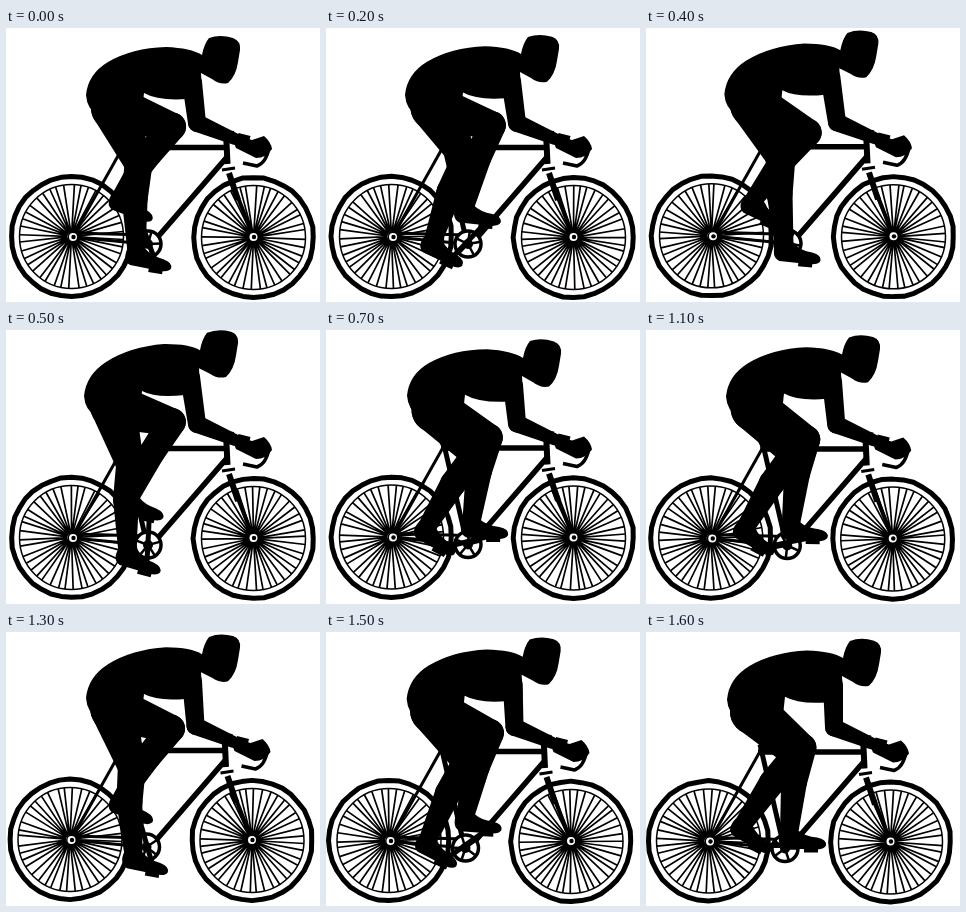
These frames come from a looping animation (314x274 px, 1.7 s). An HTML page with a canvas:

```html
<!DOCTYPE html>
<html>
<head>
<meta charset="utf-8">
<style>
  html, body { margin: 0; width: 100%; height: 100%; overflow: hidden; background: #fff; }
  canvas { display: block; }
</style>
</head>
<body>
<canvas id="stage" width="314" height="274"></canvas>
<script>
const ctx = document.getElementById('stage').getContext('2d');
const TAU = Math.PI * 2, RAD = Math.PI / 180;
const STEPS = 17, STEP_MS = 100;
const CRANK = { x: 142, y: 213 }, CRANK_LENGTH = 27;
const THIGH = 61, SHANK = 87;

// step, crank angle, bike x, bike y, torso x, torso y
const KEYS = [
  [0, 70, 0, 0, 0, 0],
  [2, 134, 0, 0, -1, -1],
  [5, 273, 0, -1, -2, -7],
  [7, 346, 0, -1.5, 1, 1],
  [9, 443, 0, 0, 0, 0],
  [13, 614, -1.5, -1, 0, -5],
  [16, 720, -3, .5, 1, -1],
  [17, 790, 0, 0, 0, 0]
];

const TORSO = new Path2D(`M196 27 Q185 20 160 19 Q126 20 102 34 Q82 46 80 67 Q81 81 92 88
  Q107 99 116 121 L132 121 L138 65 Q152 73 181 71 L196 66 L195 45
  L206 51 Q214 57 222 55 Q230 48 232 34 L234 22 Q235 13 227 10 Q214 6 203 10 Q198 16 196 27Z`);
const HAND = new Path2D('M224 105 L246 112 L258 108 Q265 114 266 121 Q260 130 250 130 L230 120Z');
const SHOE = new Path2D('M-32 -14 L-14 -15 Q-7 -9 5 -8 Q15 -6 14 0 Q12 4 4 4 L-27 3 Q-36 0 -32 -14Z');

function pose(step) {
  const i = KEYS.findIndex(k => k[0] > step);
  const a = KEYS[i - 1], b = KEYS[i];
  const u = (step - a[0]) / (b[0] - a[0]);
  return a.map((v, n) => v + (b[n] - v) * u);
}

function random(seed) {
  return () => (seed = (seed * 16807) % 2147483647) / 2147483647;
}

function stroke(path, width) {
  ctx.lineWidth = width;
  ctx.stroke(new Path2D(path));
}

function disc(x, y, r, color = '#000') {
  ctx.fillStyle = color;
  ctx.beginPath();
  ctx.arc(x, y, r, 0, TAU);
  ctx.fill();
  ctx.fillStyle = '#000';
}

function ring(x, y, r, width) {
  ctx.lineWidth = width;
  ctx.beginPath();
  ctx.arc(x, y, r, 0, TAU);
  ctx.stroke();
}

function limb(a, b, ra, rb) {
  const t = Math.atan2(b.y - a.y, b.x - a.x), q = Math.PI / 2;
  ctx.beginPath();
  ctx.arc(a.x, a.y, ra, t + q, t - q);
  ctx.arc(b.x, b.y, rb, t - q, t + q);
  ctx.fill();
}

function wheel(x, y, seed, turn) {
  const rnd = random(seed), sides = 36, spokes = 40;
  ctx.lineWidth = 5;
  ctx.beginPath();
  for (let i = 0; i < sides; i++) {
    const a = i / sides * TAU, r = 59.7 + rnd() * .8;
    ctx.lineTo(x + r * Math.cos(a), y + r * Math.sin(a));
  }
  ctx.closePath();
  ctx.stroke();
  ring(x, y, 52, 1.5);
  ctx.lineWidth = 1.7;
  ctx.beginPath();
  for (let i = 0; i < spokes; i++) {
    const a = (i + rnd() * .4) / spokes * TAU + turn;
    ctx.moveTo(x + 4 * Math.cos(a), y + 4 * Math.sin(a));
    ctx.lineTo(x + 52 * Math.cos(a), y + 52 * Math.sin(a));
  }
  ctx.stroke();
}

function hub(x, y) {
  disc(x, y, 5.5);
  disc(x, y, 4, '#fff');
  disc(x + .5, y, 2.2);
}

function bike(step) {
  wheel(65.5, 208.5, 71 + step, step * .05);
  wheel(247.5, 209.5, 913 + step, step * .05);
  stroke('M117 119 L67 208', 3);
  stroke('M67 209 L140 216 M68 205 L140 207', 3);
  stroke('M117 112 L141 215', 5);
  stroke('M115 119.5 H221 M221 129 L150 211', 5.5);
  stroke('M220 104 L221.5 136', 6);
  stroke('M216 142 L229 140', 3);
  stroke('M223 145 L232 172', 6);
  stroke('M231 167 L247 208', 4);
  stroke('M218 104 L228 105 M232 107 L244 110', 4);
  stroke('M263 120 Q260 135 251 138 L237 135', 3.5);
  hub(67, 209);
  hub(247.5, 209);
}

function crankset(angle) {
  const { x, y } = CRANK, dx = CRANK_LENGTH * Math.cos(angle), dy = CRANK_LENGTH * Math.sin(angle);
  disc(x, y + 3, 14, '#fff');
  ring(x, y + 3, 13, 3.5);
  for (let i = 0; i < 5; i++) {
    const a = angle + i * TAU / 5;
    stroke(`M${x} ${y + 3} l${13 * Math.cos(a)} ${13 * Math.sin(a)}`, 2.5);
  }
  disc(x, y + 3, 5);
  stroke(`M${x - dx} ${y - dy} L${x + dx} ${y + dy}`, 5);
}

function leg(hip, angle) {
  const ball = { x: CRANK.x + CRANK_LENGTH * Math.cos(angle), y: CRANK.y + CRANK_LENGTH * Math.sin(angle) };
  const tilt = (14 - 14 * Math.cos(angle)) * RAD, c = Math.cos(tilt), s = Math.sin(tilt);
  const ankle = { x: ball.x - 23 * c + 12 * s, y: ball.y - 23 * s - 12 * c };
  const dx = ankle.x - hip.x, dy = ankle.y - hip.y;
  const d = Math.min(Math.hypot(dx, dy), THIGH + SHANK);
  const bend = Math.acos((THIGH ** 2 + d * d - SHANK ** 2) / (2 * THIGH * d));
  const t = Math.atan2(dy, dx) - bend;
  const knee = { x: hip.x + THIGH * Math.cos(t), y: hip.y + THIGH * Math.sin(t) };
  const calf = { x: knee.x * .6 + ankle.x * .4 - 3, y: knee.y * .6 + ankle.y * .4 };
  limb(hip, knee, 23, 14);
  limb(knee, calf, 14, 13);
  limb(calf, ankle, 13, 9);
  ctx.save();
  ctx.translate(ball.x, ball.y);
  ctx.rotate(tilt);
  ctx.fill(SHOE);
  ctx.fillRect(-8, 3, 14, 4);
  ctx.restore();
}

function rider(angle, x, y) {
  const hip = { x: 108 + x * .5, y: 80 + y * .5 };
  leg(hip, angle);
  leg(hip, angle + Math.PI);
  // the torso pivots near the hip, so the head moves most
  const lean = y / 120;
  ctx.save();
  ctx.transform(1, lean, 0, 1, x, -80 * lean);
  ctx.fill(TORSO);
  ctx.restore();
  const elbow = { x: 191, y: 95 };
  limb({ x: 186 + x, y: 54 + y }, elbow, 10, 9);
  limb(elbow, { x: 229, y: 111 }, 9, 6);
  ctx.fill(HAND);
}

function draw() {
  const step = Math.floor(performance.now() / STEP_MS) % STEPS;
  const [, degrees, bx, by, tx, ty] = pose(step);
  ctx.fillStyle = '#fff';
  ctx.fillRect(0, 0, 314, 274);
  ctx.fillStyle = ctx.strokeStyle = '#000';
  ctx.lineJoin = 'round';
  ctx.save();
  ctx.translate(bx, by);
  bike(step);
  crankset(degrees * RAD);
  rider(degrees * RAD, tx - bx, ty - by);
  ctx.restore();
  requestAnimationFrame(draw);
}
draw();
</script>
</body>
</html>
```
